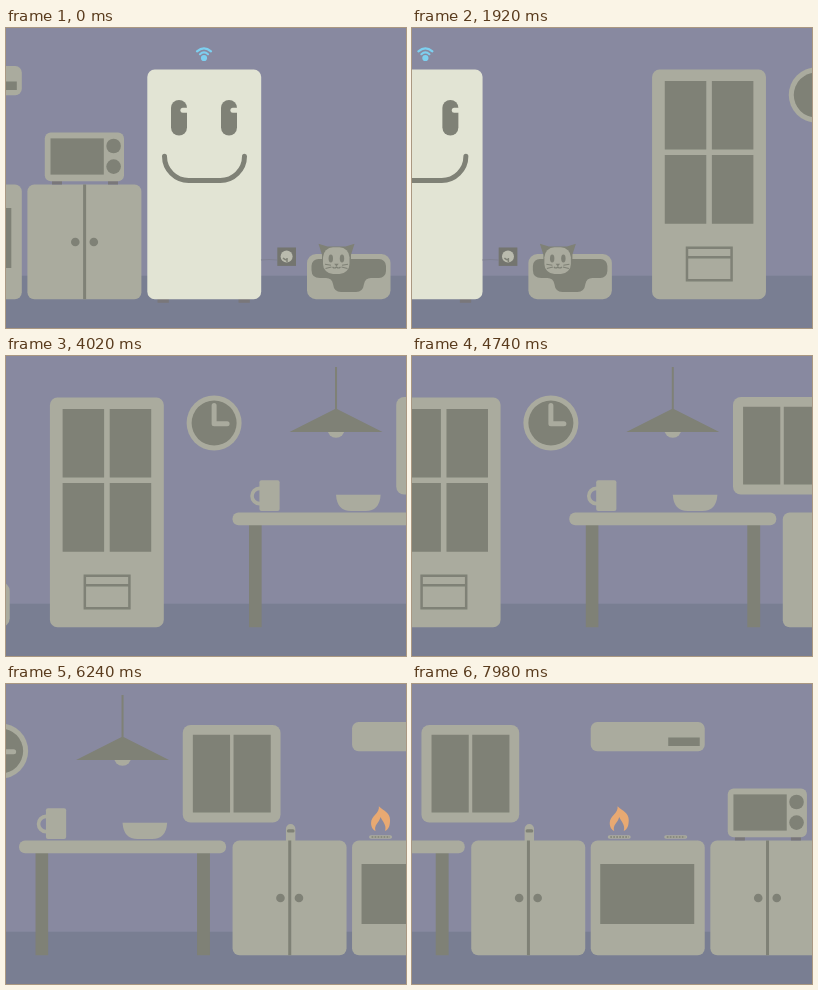
An HTML page that plays this animation: 400x300 px, repeating every 8000 ms.

```html
<!DOCTYPE html>
<html lang="en">
<head>
<meta charset="utf-8">
<title>Kitchen</title>
<style>
  html, body { margin: 0; width: 100%; height: 100%; overflow: hidden; background: #8889a0; }
  svg { display: block; width: 100vw; height: 100vh; }
  .light { fill: #aaab9e; }
  .dark { fill: #7f8176; }
  .feet { fill: #79777a; }
  .cream { fill: #e2e4d4; }
  .lightLine { fill: none; stroke: #aaab9e; }
  .darkLine { fill: none; stroke: #7f8176; }
  .signal { fill: none; stroke: #7dd0f0; stroke-width: 2.2; stroke-linecap: round; }
</style>
</head>
<body>
<svg viewBox="0 0 400 300">
  <defs>
    <g id="cabinet">
      <rect class="light" y="156.5" width="114" height="114.7" rx="7"/>
      <rect class="dark" x="55.7" y="156.5" width="3" height="114.7"/>
      <circle class="dark" cx="47.9" cy="214" r="4.3"/>
      <circle class="dark" cx="66.4" cy="214" r="4.3"/>
    </g>
    <g id="burner">
      <rect class="light" y="151.2" width="23" height="3.6" rx="1.8"/>
      <path class="darkLine" d="M2.5 153H21" stroke-width="1.6" stroke-dasharray="1.8 1.2"/>
    </g>
    <g id="eye">
      <rect class="dark" y="72" width="16" height="35.5" rx="8"/>
      <rect class="cream" x="9.4" y="79.8" width="9" height="5" rx="2.5"/>
    </g>

    <g id="room">
      <!-- cupboard and microwave -->
      <use href="#cabinet" x="21.4"/>
      <path class="feet" d="M46 153h10v3.4h-10zM102 153h10v3.4h-10z"/>
      <rect class="light" x="38.8" y="104.4" width="79.2" height="48.8" rx="6"/>
      <rect class="dark" x="44.5" y="110.4" width="53.3" height="36.2"/>
      <circle class="dark" cx="107.6" cy="118" r="7.3"/>
      <circle class="dark" cx="107.6" cy="138.6" r="7.3"/>

      <!-- fridge -->
      <path class="feet" d="M151.5 271h11.3v3.7h-11.3zM232.5 271h11.3v3.7h-11.3z"/>
      <rect class="cream" x="141.3" y="41.5" width="113.9" height="229.7" rx="7.5"/>
      <use href="#eye" x="165"/>
      <use href="#eye" x="215"/>
      <path class="darkLine" stroke-width="5" stroke-linecap="round"
        d="M158.5 128.3a24.2 24.2 0 0 0 24.5 24.2h31a24.2 24.2 0 0 0 24.5-24.2"/>
      <circle cx="198" cy="30" r="3.1" fill="#7dd0f0"/>
      <path class="signal" d="M191 23.3Q198 17.3 205 23.3M194 26.2Q198 22.6 202 26.2"/>

      <!-- socket -->
      <path d="M255 232q8-1 16 0" fill="none" stroke="#7f8092" stroke-width="1.2"/>
      <rect x="271.3" y="219.5" width="18.7" height="18.4" fill="#74756f"/>
      <circle cx="280.6" cy="228.6" r="6" fill="#babbae"/>
      <path class="darkLine" d="M277 230q2 2 4 2M281 230v4" stroke-width="1.5"/>

      <!-- cat bed -->
      <rect class="light" x="301" y="226" width="83.5" height="45.2" rx="9"/>
      <path class="dark" d="M313 231H373a7 7 0 0 1 7 7v5a7 7 0 0 1-7 7h-8q-6 0-7 6-1 8-8 8h-15q-7 0-8-8-1-6-7-6h-6q-8.500 0-8.500-8v-4a7 7 0 0 1 7.500-7z"/>
      <path class="dark" d="M312.500 215.800l9 2.700h18l9-2.700-3.500 11v10h-29v-10z"/>
      <rect class="light" x="317" y="219.300" width="26.500" height="26.700" rx="10"/>
      <ellipse class="dark" cx="324.800" cy="230.500" rx="2.200" ry="3.900"/>
      <ellipse class="dark" cx="336" cy="230.500" rx="2.200" ry="3.900"/>
      <path class="dark" d="M328.200 235.800h4.500l-2.250 2.700z"/>
      <path class="darkLine" d="M326.500 239q2 2 4 0 2 2 4 0M319 236.200l6 1M319.500 240.500l6-1.500M342 236.200l-6 1M341.500 240.500l-6-1.500" stroke-width="1.100"/>

      <!-- door -->
      <rect class="light" x="424.700" y="41.500" width="113.900" height="229.700" rx="7.500"/>
      <path class="dark" d="M437.400 52.900h41.500v68.600h-41.500zM484.500 52.900h41.500v68.600h-41.500zM437.400 127h41.500v68.700h-41.500zM484.500 127h41.500v68.700h-41.500z"/>
      <path class="darkLine" stroke-width="2.500" d="M459.600 219.800h44.600v32.500h-44.600zM459.600 229.300h44.600"/>

      <!-- clock -->
      <circle class="light" cx="588.900" cy="67" r="27.500"/>
      <circle class="dark" cx="588.900" cy="67" r="22.500"/>
      <path class="lightLine" d="M588.900 49.500V67.800h13" stroke-width="5" stroke-linecap="round" stroke-linejoin="round"/>

      <!-- table, mug, bowl -->
      <path class="dark" d="M623.800 168h12.600v103.200h-12.600zM785.300 168h12.900v103.200h-12.900z"/>
      <rect class="light" x="607.300" y="156.500" width="207" height="12.700" rx="6"/>
      <ellipse class="lightLine" cx="634.300" cy="140" rx="7.500" ry="7.600" stroke-width="3.600"/>
      <rect class="light" x="634.200" y="124.300" width="20.200" height="30.700" rx="2"/>
      <path class="light" d="M710.800 138.700h44.600q-1 16.300-15 16.300h-14.600q-14 0-15-16.300z"/>

      <!-- lamp -->
      <circle class="light" cx="710.800" cy="73" r="8.700"/>
      <path class="dark" d="M709.800 11h2v42l45.500 23h-93l45.500-23z"/>

      <!-- window -->
      <rect class="light" x="771" y="40.900" width="97.800" height="97.600" rx="8"/>
      <path class="dark" d="M781.100 50.700h37.200v77.800h-37.200zM821.800 50.700h37.200v77.800h-37.200z"/>

      <!-- sink -->
      <path class="light" d="M874.200 158v-13.300a4.700 4.700 0 0 1 9.400 0V158z"/>
      <rect class="dark" x="875.200" y="145.200" width="7.600" height="3.400" rx="1.500"/>
      <use href="#cabinet" x="820.800"/>

      <!-- hood and stove -->
      <rect class="light" x="940.300" y="38" width="114" height="29.200" rx="6.500"/>
      <rect class="dark" x="1017.800" y="53.500" width="31.500" height="8.500"/>
      <rect class="light" x="940.300" y="156.500" width="114" height="114.700" rx="7"/>
      <rect class="dark" x="949.800" y="180" width="94" height="60"/>
      <use href="#burner" x="957.300"/>
      <use href="#burner" x="1013.800"/>
      <path fill="#e8a972" transform="translate(669.300)"
        d="M297.800 122.300C299 129 290 132 290 139C290 143 292 146 294.500 147C292.500 141 298 139 299.500 133C301 137 306 141 304 147C308 145 309 141 309 136C309 129 303 127 297.800 122.300Z"/>
    </g>
  </defs>

  <rect width="400" height="300" fill="#8889a0"/>
  <rect y="247.700" width="400" height="52.300" fill="#797e92"/>
  <g id="scroller">
    <use href="#room" x="-1038.500"/>
    <use href="#room"/>
    <use href="#room" x="1038.500"/>
  </g>
</svg>
<script>
  const LOOP = 8000, TICK = 60;
  const STEP = 1038.5 / 180;  // one trip round the room takes 180 steps
  const HOLD_TICK = 50;       // the scroll rests for one tick here
  const scroller = document.getElementById('scroller');

  function draw() {
    const tick = Math.floor(performance.now() % LOOP / TICK);
    const steps = tick < HOLD_TICK ? tick : tick - 1;
    scroller.setAttribute('transform', `translate(${-steps * STEP})`);
    requestAnimationFrame(draw);
  }
  draw();
</script>
</body>
</html>
```
